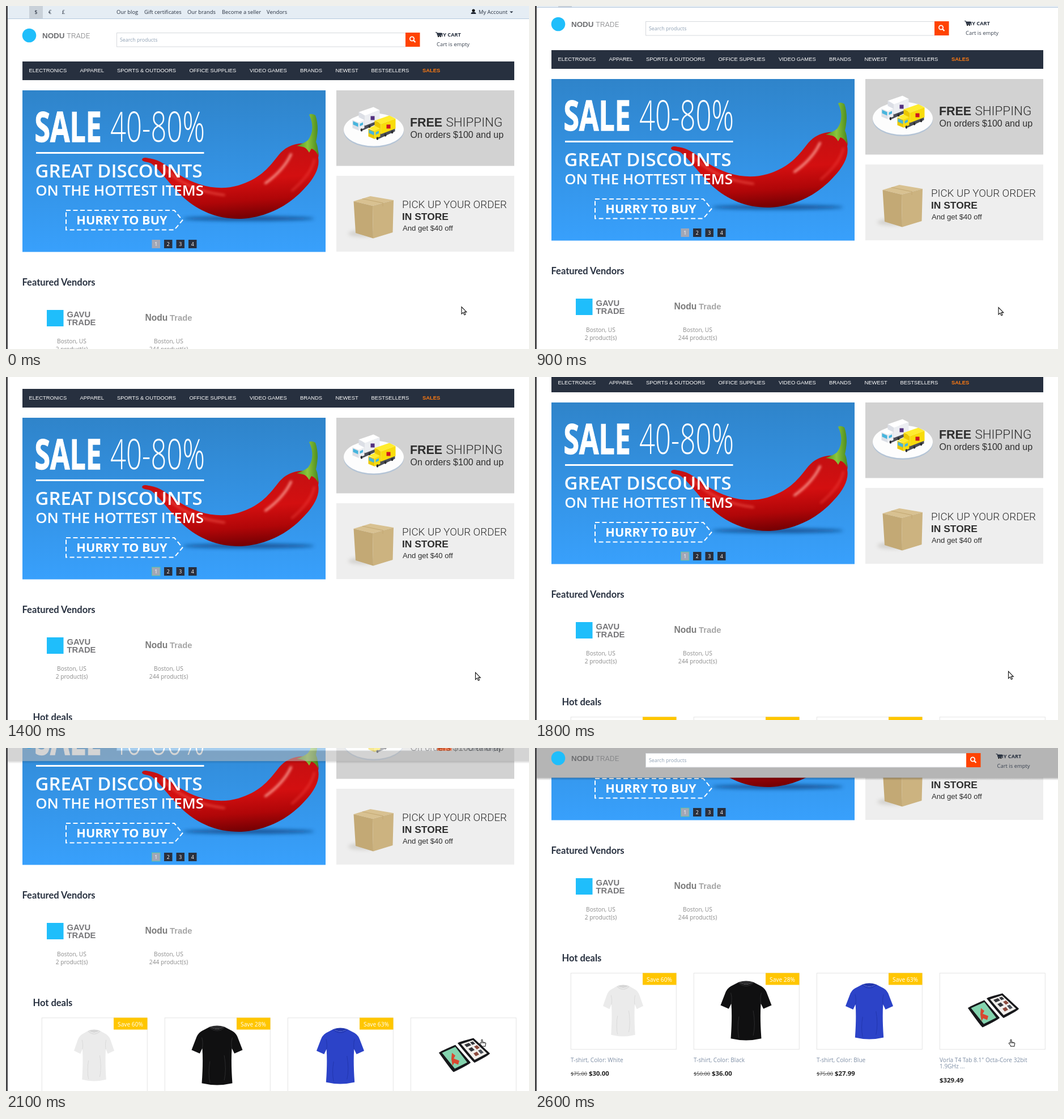
These frames come from a looping animation (923 px wide and 606 px high, 2.7 s). An HTML page:

```html
<!DOCTYPE html>
<html lang="en">
<head>
<meta charset="utf-8">
<title>Shop page scroll</title>
<style>
html, body { margin: 0; width: 100%; height: 100%; overflow: hidden; background: #fff; }
svg { display: block; width: 923px; height: 606px; }
text { font-family: "Open Sans", "Noto Sans", sans-serif; }
.ari { font-family: "Liberation Sans", Arial, sans-serif; }
.rob { font-family: Roboto, sans-serif; font-weight: 300; }
.lat { font-family: Lato, sans-serif; }
.b { font-weight: 700; }
.sb { font-weight: 600; }
.mid { text-anchor: middle; }
.old { text-decoration: line-through; }
</style>
</head>
<body>
<svg id="stage" viewBox="0 0 923 606">
  <defs>
    <linearGradient id="sky" x2="0" y2="1">
      <stop stop-color="#2f84ca"/><stop offset="1" stop-color="#38a0fc"/>
    </linearGradient>
    <linearGradient id="pepper" x1=".35" y1=".1" x2=".5" y2="1">
      <stop stop-color="#c41012"/><stop offset=".45" stop-color="#d30f10"/>
      <stop offset=".75" stop-color="#b00608"/><stop offset="1" stop-color="#750003"/>
    </linearGradient>
    <linearGradient id="stem">
      <stop stop-color="#4f8f1e"/><stop offset=".5" stop-color="#8cc63c"/><stop offset="1" stop-color="#4b8a1d"/>
    </linearGradient>
    <linearGradient id="drop" x2="0" y2="1">
      <stop stop-color="#000" stop-opacity=".28"/><stop offset="1" stop-color="#000" stop-opacity="0"/>
    </linearGradient>
    <filter id="soft" x="-20%" y="-200%" width="140%" height="500%"><feGaussianBlur stdDeviation="3"/></filter>
    <filter id="glow" x="-30%" y="-50%" width="160%" height="200%"><feGaussianBlur stdDeviation="2"/></filter>
  </defs>
  <rect width="923" height="606" fill="#fff"/>
  <g id="page"></g>
  <g id="bar"></g>
  <rect width="3" height="606" fill="#48484b"/>
  <path id="arrow" d="M0 0V12.6L2.9 9.9 5 14.4 7 13.5 5 9.1H8.8Z" fill="#fff" stroke="#111" stroke-width="1.1"/>
  <g id="hand" fill="#fff" stroke="#111" stroke-width="1">
    <path d="M3.5 7V1.6Q3.5.5 4.5.5T5.5 1.6V5.2L10.2 6Q11.4 6.3 11.3 7.6L10.6 10.6V12.6H3.8V11L.8 7.6Q.4 6.3 1.7 6.3Z"/>
    <path d="M5.5 5V7.4M7.4 5.5V7.4M9.3 5.9V7.6" fill="none" stroke-width=".8"/>
  </g>
</svg>
<script>
const $ = id => document.getElementById(id);
const ink = '#27303f';

const text = (x, y, size, str, fill, cls = '') =>
  `<text x="${x}" y="${y}" font-size="${size}" fill="${fill}" class="${cls}">${str}</text>`;
const rect = (x, y, w, h, fill, more = '') =>
  `<rect x="${x}" y="${y}" width="${w}" height="${h}" fill="${fill}" ${more}/>`;
const path = (d, fill, more = '') => `<path d="${d}" fill="${fill}" ${more}/>`;
const line = (d, color, width, more = '') =>
  path(d, 'none', `stroke="${color}" stroke-width="${width}" ${more}`);
const at = (x, y, body) => `<g transform="translate(${x} ${y})">${body}</g>`;

// Header parts, shared by the page top and the sticky bar
const logo = y => at(0, y,
  '<circle cx="41" cy="0" r="12.3" fill="#1fbefb"/>' +
  text(64, 5, 13.4, 'NODU', '#6d6e71', 'ari b') +
  text(107, 5, 13.4, 'TRADE', '#77787b', 'rob'));

const search = (y, w) => at(195, y,
  rect(.5, .5, w, 24.5, '#fff', 'stroke="#d6d9dd"') +
  text(6, 16, 8.8, 'Search products', '#8fa1b4') +
  rect(w, 0, 25.5, 25, '#ff4300') +
  at(w + 11.5, 11, '<circle r="3.6" fill="none" stroke="#fff" stroke-width="1.8"/>' +
    line('M2.7 2.7L6 6', '#fff', 2.2)));

const cart = (x, y) => at(x, y,
  text(3, 3.5, 9.2, 'MY CART', ink, 'b') +
  line('M-1.5 -3.5H.5L2.5 2.5H8', ink, 1.1) +
  path('M1 -2.5H9.5L8.3 1.5H2.2Z', ink) +
  '<circle cx="3.5" cy="4" r="1.1"/><circle cx="7.2" cy="4" r="1.1"/>' +
  text(.5, 20.5, 9.43, 'Cart is empty', '#3a4351'));

function topBar() {
  const links = [[195, 'Our blog'], [244, 'Gift certificates'], [320, 'Our brands'],
    [381, 'Become a seller'], [460, 'Vendors'], [834, 'My Account']];
  const money = [[53, '$'], [77.5, '€'], [101.5, '£']];
  return rect(3, 0, 920, 22, '#e5edf4') + rect(3, 22, 920, 1, '#b4c8de') +
    rect(41, 0, 24, 22, '#c9d1d9') +
    money.map(([x, s]) => text(x, 13.7, 9.4, s, ink, 'mid')).join('') +
    links.map(([x, s]) => text(x, 13.7, 9.4, s, ink)).join('') +
    '<circle cx="825" cy="8" r="2.5"/>' +
    path('M820.5 14Q820.5 10.5 825 10.5T829.5 14Z', '#1d2430') +
    path('M889 9.5H895L892 12.5Z', ink);
}

function nav() {
  const items = [[40.5, 'ELECTRONICS'], [130.5, 'APPAREL'], [196, 'SPORTS &amp; OUTDOORS'],
    [323.5, 'OFFICE SUPPLIES'], [430, 'VIDEO GAMES'], [519, 'BRANDS'], [581.5, 'NEWEST'],
    [644.5, 'BESTSELLERS']];
  return rect(29, 98, 868, 33, ink) +
    items.map(([x, s]) => text(x, 116.5, 9.4, s, '#fff', 'ari')).join('') +
    text(735, 116.5, 9.4, 'SALES', '#ff7a12', 'ari b');
}

const chili = () =>
  '<ellipse cx="428" cy="375.5" rx="116" ry="4" fill="#0c3d78" opacity=".75" filter="url(#soft)"/>' +
  path('M240 271Q242 266 252 269C272 271 284 283 304 297C338 319 376 327 410 317' +
    'C446 306 462 288 479 266C494 246 512 242 530 243C546 244 554 254 551 268' +
    'C554 284 546 302 527 322C500 352 462 373 415 376C374 377 340 362 314 339' +
    'C290 317 272 289 256 278C250 275 240 276 240 271Z', 'url(#pepper)') +
  `<g filter="url(#glow)" fill="none" stroke-linecap="round">` +
  line('M503 262Q490 290 458 313', '#ffb0a4', 4, 'opacity=".85"') +
  line('M276 284Q318 326 385 334', '#f2584d', 4, 'opacity=".6"') +
  line('M544 272Q538 298 505 326', '#f0453d', 4, 'opacity=".5"') + '</g>' +
  path('M535 192Q539 189 546 193Q550 204 550 219Q549 232 547 240Q551 248 551 264' +
    'Q546 254 539 252L535 259Q530 250 524 249L513 247Q527 242 533 237Q547 218 535 192Z', 'url(#stem)');

function banner() {
  let pager = '';
  for (let i = 0; i < 4; i++) {
    pager += rect(257.5 + i * 21.5, 413, 14.5, 15, i ? '#292f3d' : '#a2a7b6', i ? '' : 'id="dot"') +
      text(264.7 + i * 21.5, 423.7, 8.8, i + 1, '#fff', 'mid');
  }
  return rect(29, 149, 535, 285.5, 'url(#sky)') + chili() +
    '<g transform="translate(50.5 240) scale(.685 1)" stroke="#fff">' +
    `<text font-size="73" fill="#fff" class="b" stroke-width="1.4">SALE</text></g>` +
    '<g transform="translate(184 240) scale(.67 1)">' +
    `<text font-size="73" fill="#fff" font-weight="300">40-80%</text></g>` +
    rect(53, 258, 296.5, 3, '#fff') +
    text(51.5, 303, 32.9, 'GREAT DISCOUNTS', '#fff', 'sb') +
    text(52.2, 335, 25.9, 'ON THE HOTTEST ITEMS', '#fff', 'sb') +
    line('M106 361H297L311.5 378.5 297 395.5H106Z', '#fff', 2, 'stroke-dasharray="8 4.5"') +
    text(124.3, 386, 21.7, 'HURRY TO BUY', '#fff', 'b') + pager;
}

function truck(x, y, top, side, front, badge) {
  const wheel = (cx, cy) => `<ellipse cx="${cx}" cy="${cy}" rx="2" ry="2.7" fill="#2b2d33"/>`;
  return at(x, y,
    path('M12 36L20 41 48 28V21L22 32Z', '#4b4e57') +
    path('M12 9L38 0 49 5.5 23 15Z', top) + path('M12 9L23 15V33L12 28Z', front) +
    path('M23 15L49 5.5V23L23 33Z', side) +
    path('M2 22L12 18 22 23 12 27.5Z', top) + path('M1 23L12 27.5V41.5L1 37Z', front) +
    path('M12 27.5L22 23V37L12 41.5Z', side) +
    path('M2 25L11 29V35L2 31Z', '#47b5dd') + path('M14 29.5L19.5 27V31.5L14 34Z', '#47b5dd') +
    wheel(17, 40.5) + wheel(31, 34.5) + wheel(43, 29) + rect(33, 16, 7, 7, badge));
}

const promos = () =>
  rect(583, 149, 314, 133.5, '#d2d2d2') +
  '<ellipse cx="649" cy="221" rx="53" ry="29" fill="#b4c4d6"/>' +
  '<ellipse cx="649" cy="218.5" rx="53" ry="29" fill="#fdfdfd"/>' +
  truck(610.5, 178.5, '#fff', '#eceef2', '#dcdfe6', '#52307f') +
  truck(638.5, 193.5, '#ffec2e', '#f8dc0c', '#ecc800', '#cf1420') +
  text(713, 213, 21.4, 'FREE', '#2e2e2e', 'ari b') +
  text(776.5, 213, 22.4, 'SHIPPING', '#2e2e2e', 'rob') +
  text(713.5, 232.5, 16, 'On orders $100 and up', '#2e2e2e', 'ari') +
  rect(583, 300, 314, 134, '#eee') +
  '<ellipse cx="630" cy="402" rx="26" ry="6" fill="#c9c7c3" opacity=".7" filter="url(#soft)"/>' +
  path('M613.5 345L643 336 684 343 647 353Z', '#d8c191') +
  path('M613.5 345L647 353 648 410.5 617 401Z', '#c3a975') +
  path('M647 353L684 343 682.5 400 648 410.5Z', '#ccb380') +
  line('M629 340.5L665 348V354', '#c4a974', 1.2) +
  text(699, 357, 18.7, 'PICK UP YOUR ORDER', '#2e2e2e', 'rob') +
  text(699, 378, 17.4, 'IN STORE', '#2e2e2e', 'ari b') +
  text(700, 397, 13.1, 'And get $40 off', '#2e2e2e', 'ari');

function vendors() {
  const place = (x, n) => text(x, 596, 10.2, 'Boston, US', '#8b8b8b', 'mid') +
    text(x, 609.7, 10.2, n + ' product(s)', '#8b8b8b', 'mid');
  return text(28.5, 493.7, 16.5, 'Featured Vendors', ink, 'lat b') +
    rect(72, 537, 29.5, 29, '#1fbefb') +
    text(107.5, 549.5, 14.8, 'GAVU', '#77777a', 'ari b') +
    text(107.5, 564.3, 14.8, 'TRADE', '#77777a', 'ari b') +
    text(245.5, 556, 15.6, 'Nodu', '#7b7b7b', 'ari b') +
    text(289, 556, 14.8, 'Trade', '#a6a6a6', 'ari b') +
    place(116, 2) + place(287, 244);
}

// Drawn in a 100 x 100 box
const shirt = (x, y, w, h, fill, shade) =>
  `<g transform="translate(${x} ${y}) scale(${w / 100} ${h / 100})">` +
  path('M36 2Q50 10 64 2L80 9Q88 13 91 21L100 41 84 47 79 38Q77 62 80 97Q50 103 20 97' +
    'Q23 62 21 38L16 47 0 41 9 21Q12 13 20 9Z', fill) +
  path('M36 2Q50 -2 64 2Q50 10 36 2Z', shade) +
  line('M35 3Q50 14 65 3M21 38Q23 28 20 20M79 38Q77 28 80 20M36 60Q32 80 36 96M64 50Q69 74 64 92',
    shade, 1.1) + '</g>';

const tablets = () => at(714, 704.5,
  path('M50 62Q51 60 79 48L106 79Q105 82 76 96Q74 96 50 62Z', '#17181b') +
  path('M55.5 62L79 51.5 100 79 78 90Z', '#84d3ae') +
  path('M73 62L79 67 76 72 86 76 84 83 77 80 74 85 72 73Z', '#d9472f') +
  path('M83 45Q84 43 111 36L140 63Q139 66 113 79.5Q111 79.5 83 45Z', '#17181b') +
  path('M89 46.5L110 39.5 135 63 113 74.5Z', '#f1efec') +
  path('M95 47.5L103 44.5 107 48.5 99 52ZM105 43.5L110 42 114 46 109 48ZM102 55L108 52 113 57 107 60Z', '#35363a') +
  path('M112 51L117 48.5 122 53 117 56ZM111 63L117 60 121 65 115 68Z', '#8c4a3d') +
  path('M119 58L124 56 129 61.5 124 64Z', '#4a4f57'));

function deals() {
  const items = [
    ['T-shirt, Color: White', 'Save 60%', '$75.00', '$30.00', shirt(57, 21, 71, 91, '#ebebeb', '#d6d6d6')],
    ['T-shirt, Color: Black', 'Save 28%', '$50.00', '$36.00', shirt(47.5, 14, 90, 105, '#101011', '#2c2c2e')],
    ['T-shirt, Color: Blue', 'Save 63%', '$75.00', '$27.99', shirt(51, 18, 84, 99, '#2c43c8', '#2236ad')]];
  const frame = rect(.3, .3, 186, 134.5, '#fff', 'stroke="#e4e4e4"');
  const name = '#7f8fa6';
  return text(47.5, 684, 16.5, 'Hot deals', ink, 'lat b') +
    items.map(([title, save, old, now, art], i) => at(63 + 217 * i, 704.5,
      frame + art + rect(127, 0, 59.5, 21, '#ffc600') +
      text(156.5, 15.3, 10.2, save, '#fff', 'mid') +
      text(0, 157, 10.1, title, name) +
      text(0, 181.3, 9.3, old, '#444', 'old') + text(32, 181.3, 11.4, now, '#222', 'b'))).join('') +
    at(714, 704.5, frame + text(0, 157, 10.1, 'Vorla T4 Tab 8.1" Octa-Core 32bit', name) +
      text(0, 168.5, 10.1, '1.9GHz ...', name) + text(0, 193, 11.4, '$329.49', '#222', 'b')) +
    tablets();
}

$('page').innerHTML = topBar() + logo(52) + search(47, 510) + cart(759.5, 50) +
  nav() + banner() + promos() + vendors() + deals();
$('bar').innerHTML = rect(3, 52, 920, 5, 'url(#drop)') + rect(3, 0, 920, 52.5, '#b5b5b5') +
  logo(18) + search(9, 566) + cart(815, 14);

// Motion keys: time, value
const scroll = [[700, 0], [800, 5], [900, 20], [1000, 42], [1400, 77], [1800, 104],
  [1900, 133], [2000, 177], [2100, 228], [2200, 278], [2300, 307]];
const barY = [[1900, -60], [2000, -43], [2300, -2], [2400, 0]];
const barFade = [[1900, .2], [2000, .42], [2300, .88], [2600, 1]];
const mouseX = [[400, 804], [900, 818], [1400, 828.5], [1800, 835.5]];
const mouseY = [[400, 531.5], [900, 532.5], [1400, 522], [1800, 520], [2000, 518.5]];

function value(keys, t) {
  if (t <= keys[0][0]) return keys[0][1];
  for (let i = 1; i < keys.length; i++) {
    const [t0, a] = keys[i - 1], [t1, b] = keys[i];
    if (t <= t1) return a + (b - a) * (t - t0) / (t1 - t0);
  }
  return keys[keys.length - 1][1];
}

const move = (id, x, y) => $(id).setAttribute('transform', `translate(${x} ${y})`);
const show = (id, on) => $(id).setAttribute('visibility', on ? 'visible' : 'hidden');

function draw(ms) {
  const t = Math.floor(ms % 2700 / 100) * 100;
  move('page', 0, -Math.round(value(scroll, t)));
  move('bar', 0, value(barY, t));
  $('bar').setAttribute('opacity', value(barFade, t));
  show('bar', t > 1900);
  $('dot').setAttribute('stroke', t >= 1400 ? '#5fc3a0' : 'none');
  const linked = t > 2000;
  move('arrow', value(mouseX, t), value(mouseY, t));
  move('hand', 835.5, 514.5);
  show('arrow', !linked);
  show('hand', linked);
}

const start = performance.now();
function tick() {
  draw(performance.now() - start);
  requestAnimationFrame(tick);
}
draw(0);
requestAnimationFrame(tick);
</script>
</body>
</html>
```
